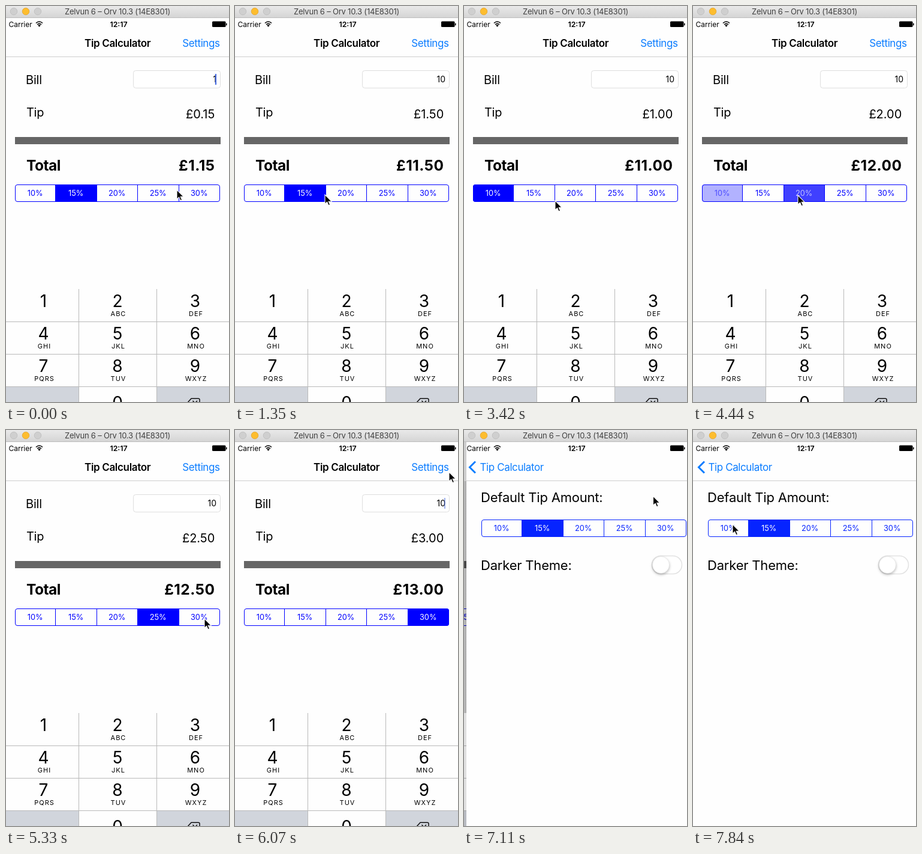
Animation of 372 by 659 pixels, one loop 7990 ms. Source, as an HTML page:

```html
<!DOCTYPE html>
<html lang="en">
<head>
<meta charset="utf-8">
<title>Tip Calculator</title>
<style>
  html, body { margin: 0; width: 100%; height: 100%; overflow: hidden; background: #fefefe; }
  svg { display: block; width: 100vw; height: 100vh; font-family: Inter, Roboto, sans-serif; white-space: pre; }
</style>
</head>
<body>
<svg id="stage" viewBox="0 0 372 659"></svg>
<script>
const LOOP = 7990, W = 372, LINK = '#0a7cff';
const RATES = [10, 15, 20, 25, 30];
const EDGES = [15.5, 82.5, 151.5, 219.5, 288.5, 356.5];

// [time, x, y] of the pointer tip, held until the next entry
const POINTER = [
  [0, 285, 306], [1050, 262, 309], [1200, 205, 313], [1350, 150, 314], [1500, 105, 313],
  [1640, 78, 312], [1790, 64, 312], [1940, 60, 312], [2090, 59, 312],
  [3120, 84, 320], [3270, 122, 326], [3410, 152, 324], [3560, 174, 320], [3700, 178, 317], [3850, 175, 315],
  [4890, 238, 314], [5040, 250, 313], [5190, 290, 314], [5330, 331, 314],
  [5770, 345, 225], [5920, 341, 114], [6070, 357, 70], [6220, 339.5, 65],
  [6960, 337, 70], [7110, 315.5, 110], [7260, 240, 145], [7400, 160, 162],
  [7550, 108, 165], [7700, 88, 161], [7840, 66, 157]
];
// [time, chosen rate index]
const CHOICES = [[0, 1], [2830, 0], [4440, 2], [5040, 3], [5480, 4]];

const lastIndex = (list, t) => list.findLastIndex(entry => entry[0] <= t);
const clamp = v => Math.max(0, Math.min(1, v));

const text = (s, x, y, size, { anchor = 'start', weight = 400, fill = '#000', gap = 0, opacity = 1 } = {}) =>
  `<text x="${x}" y="${y}" font-size="${size}" text-anchor="${anchor}" font-weight="${weight}" fill="${fill}" letter-spacing="${gap}" opacity="${opacity}">${s}</text>`;
const rect = (x, y, w, h, fill, extra = '') =>
  `<rect x="${x}" y="${y}" width="${w}" height="${h}" fill="${fill}" ${extra}/>`;
const path = (d, stroke, width, extra = '') =>
  `<path d="${d}" fill="none" stroke="${stroke}" stroke-width="${width}" ${extra}/>`;
const group = (x, y, content) => `<g transform="translate(${x} ${y})">${content}</g>`;

const DEFS = `<defs>
  <clipPath id="pill"><rect x="15" y="297" width="342" height="29" rx="4"/></clipPath>
  <linearGradient id="shade"><stop stop-color="#000" stop-opacity="0"/><stop offset="1" stop-color="#000" stop-opacity=".22"/></linearGradient>
  <linearGradient id="chrome" x2="0" y2="1"><stop stop-color="#e9e9e9"/><stop offset="1" stop-color="#d4d4d4"/></linearGradient>
</defs>`;

function segments(color, weights) {
  const cells = RATES.map((rate, i) => {
    const left = EDGES[i], right = EDGES[i + 1], w = weights[i] || 0;
    return rect(left - .5, 297, right - left + 1, 29, color, `opacity="${w}" clip-path="url(#pill)"`) +
      text(rate + '%', (left + right) / 2 - .3, 316, 12.8,
        { anchor: 'middle', fill: `color-mix(in srgb, #fff ${w * 100}%, ${color})` });
  }).join('');
  const dividers = EDGES.slice(1, 5).map(x => `M${x} 297.5V325.5`).join('');
  return cells + path(dividers, color, 1) +
    rect(15.5, 297.5, 341, 28, 'none', `rx="3.5" stroke="${color}"`);
}

function chosenWeights(t) {
  const i = lastIndex(CHOICES, t), [since, chosen] = CHOICES[i];
  if (i === 0 || t - since >= 150) return { chosen, weights: { [chosen]: 1 } };
  return { chosen, weights: { [CHOICES[i - 1][1]]: .3, [chosen]: .75 } };
}

function caretOpacity(t) {
  const phase = t % 1000;
  return t < 1050 || phase >= 540 || phase < 70 ? 1 : phase < 220 ? .5 : 0;
}

function calculator(t) {
  const bill = t < 600 ? 1 : 10;
  const { chosen, weights } = chosenWeights(t);
  const tip = bill * RATES[chosen] / 100;
  const money = v => '£' + v.toFixed(2);
  return rect(0, 20, W, 639, '#fefefe') +
    text('Bill', 33, 130, 20, { gap: -.2 }) +
    rect(212.5, 107.5, 145, 29, '#fff', 'rx="4" stroke="#dedede"') +
    text(bill, 351, 127, 14, { anchor: 'end' }) +
    rect(349, 113, 2, 18, '#4267e0', `opacity="${caretOpacity(t)}"`) +
    text('Tip', 34, 184, 20, { gap: -.3 }) +
    text(money(tip), 348.3, 187, 20, { anchor: 'end' }) +
    rect(15, 218, 343, 12, '#666') +
    text('Total', 34, 273.5, 24.5, { weight: 700, gap: -.5 }) +
    text(money(bill + tip), 348.6, 273.5, 24.5, { anchor: 'end', weight: 700, gap: .5 }) +
    segments('#00f', weights);
}

function keypad() {
  const letters = ['', 'ABC', 'DEF', 'GHI', 'JKL', 'MNO', 'PQRS', 'TUV', 'WXYZ'];
  const centers = [62.5, 186, 315.5];
  const keys = letters.map((label, i) => {
    const x = centers[i % 3], y = 501 + 54 * Math.floor(i / 3);
    return text(i + 1, x, y, 28, { anchor: 'middle' }) +
      text(label, x + 1.5, y + 15, 11, { anchor: 'middle', gap: 1 });
  }).join('');
  return rect(0, 471, W, 188, '#fefefe') +
    rect(0, 633, 121, 26, '#d1d5dc') + rect(252, 633, 120, 26, '#d1d5dc') +
    path('M121.5 471V659M251.5 471V659M0 525.5H372M0 579.5H372M0 633.5H372', '#b9b9b9', 1) +
    keys + text(0, 186, 670, 28, { anchor: 'middle' }) +
    path('M302 661L309 653.2H321Q323 653.2 323 655V668H309ZM311.5 657L319 664.5M319 657L311.5 664.5', '#111', 1.5);
}

function settings() {
  return rect(0, 20, W, 639, '#fefefe') +
    text('Default Tip Amount:', 24, 119.5, 22, { gap: -.2 }) +
    group(10, -148, segments('#0624ff', { 1: 1 })) +
    text('Darker Theme:', 24, 232.5, 22, { gap: -.2 }) +
    rect(309.5, 209.5, 50, 30, '#fff', 'rx="15" stroke="#e2e2e2" stroke-width="1.5"') +
    `<circle cx="324.5" cy="224.5" r="14" fill="#fff" stroke="#ddd" stroke-width=".6" style="filter:drop-shadow(0 2.5px 2px rgba(0,0,0,.28))"/>`;
}

// Critically damped spring, redrawn every 150 ms
function pushProgress(t) {
  if (t < 6810) return 0;
  if (t >= 7260) return 1;
  const held = 6810 + 150 * Math.floor((t - 6810) / 150);
  const s = .0205 * (held - 6786);
  return 1 - (1 + s) * Math.exp(-s);
}

function pages(t, p) {
  if (p === 1) return settings();
  const oldX = Math.round(-.3 * W * p), newX = Math.round(W * (1 - p));
  const dim = (y, h, alpha) => rect(0, y, W, h, '#000', `opacity="${alpha * p}"`);
  const back = group(oldX, 0, calculator(t));
  if (p === 0) return back + keypad();
  return back + dim(20, 451, .15) +
    rect(newX - 9, 20, 9, 65, 'url(#shade)', 'opacity=".25"') +
    rect(newX - 9, 85, 9, 386, 'url(#shade)') +
    group(oldX, 0, keypad()) + dim(471, 188, .12) +
    group(newX, 0, settings());
}

function navigation(t, p) {
  const pressed = t >= 6520 ? .3 : 1;
  const titleShift = 105.5 * p;
  return path('M0 84.5H372', '#cfcfcf', 1) +
    text('Tip Calculator', 131 - titleShift * .8, 68, 17, { weight: 600, gap: -.33, opacity: clamp(1 - 3 * p) }) +
    text('Settings', 294.3, 68, 17, { fill: LINK, gap: -.4, opacity: pressed * clamp(1 - 4 * p) }) +
    path('M19 52.5L9.5 62L19 71.5', LINK, 3, `opacity="${p}"`) +
    text('Tip Calculator', 131 - titleShift, 68, 17, { fill: LINK, gap: -.4, opacity: clamp(1.6 * p - .6) });
}

function statusBar() {
  return text('Carrier', 4.5, 34.5, 12) +
    path('M50 28.5Q55.5 23.5 61 28.5M52 31Q55.5 27.8 59 31', '#000', 1.6) +
    `<path d="M53.2 32.2Q55.5 30.4 57.8 32.2L55.5 34.8Z"/>` +
    text('12:17', 188, 34.5, 12.3, { anchor: 'middle', weight: 600 }) +
    rect(344, 25.5, 22.5, 9.5, '#000', 'rx="1.5"') + rect(367, 28.5, 1.5, 4, '#000', 'rx=".8"');
}

function windowBar() {
  const light = (x, fill, stroke) => `<circle cx="${x}" cy="9" r="5.8" fill="${fill}" stroke="${stroke}" stroke-width=".8"/>`;
  return rect(0, 0, W, 20, 'url(#chrome)') + rect(0, 19, W, 1, '#bdbdbd') +
    light(13, '#cfcfcf', '#bbb') + light(33, '#fdbd2f', '#e0a32f') + light(53, '#cfcfcf', '#bbb') +
    text('Zelvun 6 – Orv 10.3 (14E8301)', 186, 14, 13, { anchor: 'middle', fill: '#404040', gap: -.2 });
}

function pointer(t) {
  const [, x, y] = POINTER[lastIndex(POINTER, t)];
  return group(x, y, `<path d="M0 0V15.5L3.6 12.2L6 17.8L8.6 16.7L6.2 11.2H11Z" stroke="#fff" stroke-width="1.1"/>`);
}

const stage = document.getElementById('stage');
let shown = '';
function draw(now) {
  const t = now % LOOP, p = pushProgress(t);
  const picture = DEFS + pages(t, p) + navigation(t, p) + statusBar() + windowBar() + pointer(t);
  if (picture !== shown) stage.innerHTML = shown = picture;
}

const start = performance.now();
function tick() {
  draw(performance.now() - start);
  requestAnimationFrame(tick);
}
tick();
</script>
</body>
</html>
```
